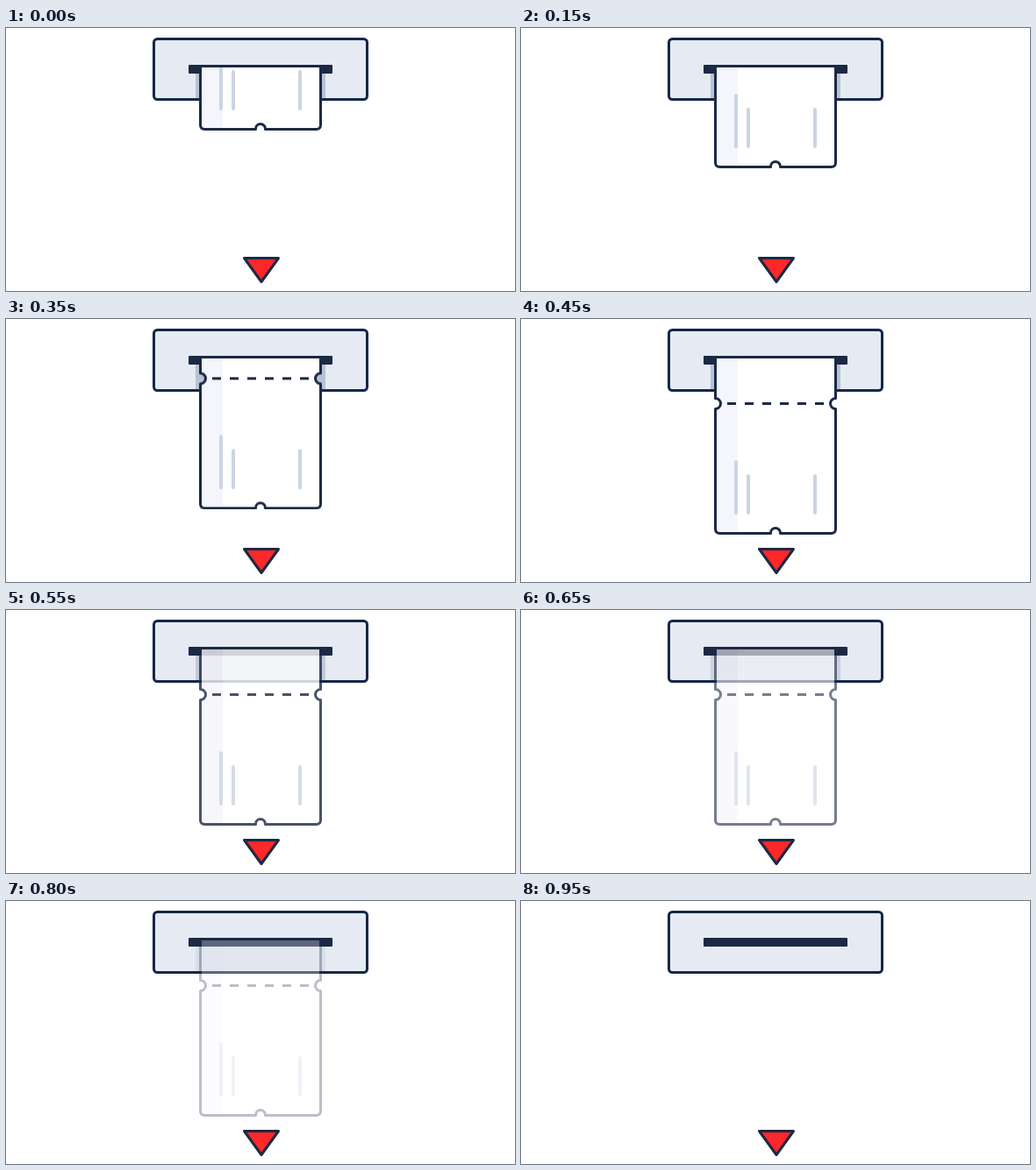
These frames come from a looping animation (580x300 px, 1000 ms). An HTML page:

```html
<!DOCTYPE html>
<html lang="en">
<head>
<meta charset="utf-8">
<title>Ticket dispenser</title>
<style>
  html, body { margin: 0; width: 100%; height: 100%; overflow: hidden; background: #fff; }
  svg { display: block; width: 580px; height: 300px; }
  .ink { stroke: #1c2944; stroke-width: 3; stroke-linejoin: round; }
  .marks { stroke: #cad4e3; stroke-width: 4; stroke-linecap: round; }
  .ticket { animation: slide 1s infinite, fade 1s infinite; }
  .shadow { animation: fade 1s infinite; }

  @keyframes slide {
    0% { transform: translateY(-129px); animation-timing-function: steps(9, end); }
    45%, 100% { transform: translateY(0); }
  }
  @keyframes fade {
    0% { opacity: 1; }
    45% { opacity: 1; animation-timing-function: steps(10, end); }
    95%, 100% { opacity: 0; }
  }
</style>
</head>
<body>
<svg viewBox="0 0 580 300" fill="none">
  <defs>
    <clipPath id="mouth"><rect x="200" y="45" width="180" height="220"/></clipPath>
    <path id="body" d="M221.5 20 V90.5 A6 6 0 0 1 221.5 102.5 V239.5 Q221.5 244.5 226.5 244.5
      H284.5 V244 A5.5 5.5 0 0 1 295.5 244 V244.5 H353.5 Q358.5 244.5 358.5 239.5
      V102.5 A6 6 0 0 1 358.5 90.5 V20 Z"/>
    <clipPath id="paper"><use href="#body"/></clipPath>
  </defs>

  <!-- machine -->
  <rect class="ink" x="168.5" y="12.5" width="243" height="69" rx="4" fill="#e5eaf3" style="stroke:#162748"/>
  <rect class="shadow" x="216" y="52" width="148" height="28" fill="#b9c2d4"/>
  <rect x="208" y="42" width="164" height="10" rx="1" fill="#1c2944"/>

  <!-- ticket -->
  <g clip-path="url(#mouth)">
    <g class="ticket">
      <use href="#body" fill="#fff"/>
      <rect x="221" y="20" width="26" height="226" fill="#f5f6fb" clip-path="url(#paper)"/>
      <path class="marks" d="M245 163 V221 M259 179 V221 M335 179 V221"/>
      <path class="ink" d="M235 96.5 H345" stroke-dasharray="10 10"/>
      <use class="ink" href="#body"/>
    </g>
  </g>

  <path class="ink" d="M271.5 262.5 H310.5 L291 289.5 Z" fill="#fd282a"/>
</svg>
</body>
</html>
```
